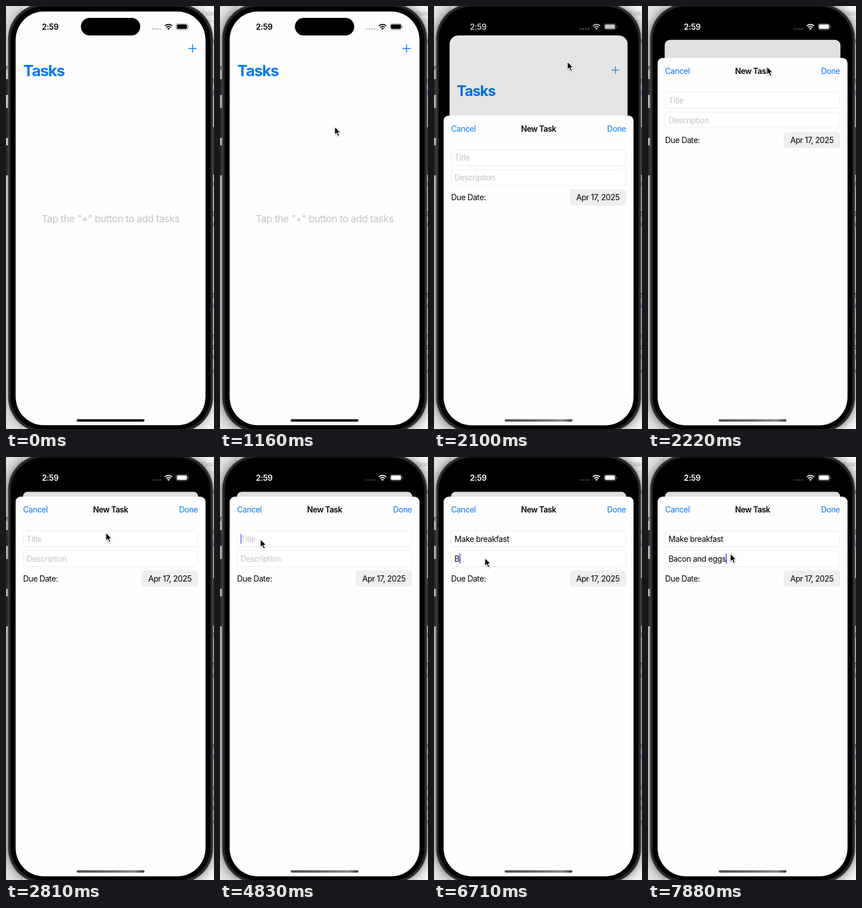
An HTML page for the animation above (8 s loop, 368 px wide and 747 px high).

```html
<!DOCTYPE html>
<html lang="en">
<head>
<meta charset="utf-8">
<title>Task list</title>
<style>
  html, body { margin: 0; width: 100%; height: 100%; overflow: hidden; background: #eee; }
  svg { display: block; width: 368px; height: 747px; }
  text { font: 14px Inter, "Liberation Sans", sans-serif; letter-spacing: -.4px; white-space: pre; }
  .blue { fill: #007aff; }
  .hint { fill: #c4c4c6; }
  .mid { text-anchor: middle; }
  .end { text-anchor: end; }
  .semi { font-weight: 600; letter-spacing: -.5px; }
  .code { font-size: 11px; fill: #222; }
  .field { fill: #fff; stroke: #ececed; }
  #heading { font-size: 27.5px; font-weight: 700; letter-spacing: -1.2px; }
  #empty { font-size: 17.5px; letter-spacing: -.47px; }
  #clock { letter-spacing: -.3px; }
</style>
</head>
<body>
<svg viewBox="0 0 368 747">
  <defs>
    <clipPath id="screen"><rect x="17" y="9.5" width="336" height="731" rx="50"/></clipPath>
    <filter id="blur" x="-20%" y="-20%" width="140%" height="140%"><feGaussianBlur stdDeviation="9"/></filter>
    <filter id="soft" x="-50%" y="-50%" width="200%" height="200%">
      <feDropShadow dx="0" dy="1" stdDeviation="1" flood-opacity=".35"/>
    </filter>
    <linearGradient id="bar">
      <stop offset="0" stop-color="#505052"/><stop offset=".5" stop-color="#69696b"/>
      <stop offset=".85" stop-color="#8a8a8c"/><stop offset="1" stop-color="#3a3a3c"/>
    </linearGradient>
  </defs>

  <!-- desktop behind the phone -->
  <rect width="368" height="747" fill="#f5f5f5"/>
  <rect width="28" height="747" fill="#e2e2e2"/>
  <path d="M28.5 0V747" stroke="#c4c4c4"/>
  <path d="M330 26.5H368" stroke="#d8d8d8"/>
  <text class="code" x="345" y="17" style="fill:#bdbdbd">Task</text>
  <text class="code" x="0" y="113">r</text>
  <rect id="shadow" x="3.5" y="-4" width="363" height="757" rx="62" filter="url(#blur)"/>
  <g id="scraps"></g>

  <!-- phone body -->
  <g fill="#2a2a2b">
    <rect x="-2" y="129" width="7" height="28"/>
    <rect x="-2" y="180" width="7" height="53"/>
    <rect x="-2" y="246" width="7" height="53"/>
    <rect x="365" y="214" width="5" height="84"/>
  </g>
  <rect x="3.5" y="-4" width="363" height="757" rx="62" fill="#545456"/>
  <rect x="4.7" y="-2.8" width="360.6" height="754.6" rx="61" fill="#28282a"/>
  <rect x="8.3" y=".8" width="353.4" height="747.4" rx="58" fill="#000"/>

  <g clip-path="url(#screen)">
    <g id="home">
      <rect id="page" x="17" y="9.5" width="336" height="731" fill="#fefefe"/>
      <path id="plus" d="M322.7 75H337.3M330 67.7V82.3" stroke="#007aff" stroke-width="1.5"/>
      <text id="heading" class="blue" x="30.5" y="123.5">Tasks</text>
      <text id="empty" class="hint mid" x="185" y="381.7">Tap the "+" button to add tasks</text>
      <rect id="dim" x="17" y="9.5" width="336" height="731"/>
    </g>
    <!-- sheet, placed at its resting position -->
    <g id="sheet">
      <rect x="17" y="70" width="336" height="720" rx="9" fill="#fefefe"/>
      <text class="blue" x="30.3" y="98.2">Cancel</text>
      <text class="semi mid" x="185" y="98.2">New Task</text>
      <text class="blue end" x="339.6" y="98.2">Done</text>
      <rect class="field" x="30.5" y="130.5" width="309" height="28" rx="4"/>
      <rect class="field" x="30.5" y="165.5" width="309" height="28" rx="4"/>
      <text id="title" x="36.3" y="149.8"></text>
      <text id="note" x="36.3" y="184.8"></text>
      <text x="30.3" y="219.8">Due Date:</text>
      <rect x="240" y="200.5" width="100" height="28.5" rx="6" fill="#eeeeef"/>
      <text class="mid" x="290" y="219.8">Apr 17, 2025</text>
      <rect id="caret" width="1.7" height="18" rx=".8" fill="#3a50f0"/>
    </g>
    <rect id="indicator" x="125" y="729.7" width="120" height="4.2" rx="2.1"/>
  </g>

  <!-- status bar -->
  <rect x="132.5" y="21" width="105" height="31" rx="15.5"/>
  <g id="dots">
    <circle cx="259.3" cy="40.5" r="1.5"/><circle cx="263.9" cy="40.5" r="1.5"/>
    <circle cx="268.5" cy="40.5" r="1.5"/><circle cx="273.1" cy="40.5" r="1.5"/>
  </g>
  <g id="status">
    <text id="clock" class="semi" x="63.5" y="42" fill="currentColor">2:59</text>
    <g fill="none" stroke="currentColor" stroke-width="2">
      <path d="M281.1 35.1A9.1 9.1 0 0 1 293.9 35.1"/>
      <path d="M283.6 37.8A5.6 5.6 0 0 1 291.4 37.8"/>
    </g>
    <path d="M287.5 42.2L285.3 39.8A3.2 3.2 0 0 1 289.7 39.8Z" fill="currentColor"/>
    <rect x="301" y="31.2" width="20.6" height="10.8" rx="3.2" fill="none" stroke="currentColor" opacity=".4"/>
    <rect x="302.4" y="32.6" width="17.8" height="8" rx="2" fill="currentColor"/>
    <path d="M322.7 35V38.4Q324 38 324 36.7T322.7 35Z" fill="currentColor" opacity=".45"/>
  </g>

  <path id="pointer" d="M0 0V14.6L3.3 11.5L5.6 17L8.2 15.9L5.9 10.6H10.4Z" stroke="#fff" stroke-width="1.1"
    stroke-linejoin="round" filter="url(#soft)"/>
</svg>
<script>
const LOOP = 8000;
const $ = id => document.getElementById(id);
const set = (id, attrs) => {
  for (const k in attrs) $(id).setAttribute(k, attrs[k]);
};
const mix = (a, b, p) => a + (b - a) * p;
const clamp = v => Math.min(1, Math.max(0, v));
const gray = v => `rgb(${[v, v, v].map(Math.round)})`;

// last key whose time has passed: [time, ...values]
const at = (keys, t) => keys.filter(k => k[0] <= t).pop();

const POINTER = [
  [470, 218, 2], [580, 215, 62], [700, 206, 132], [810, 200, 185],
  [1050, 203, 213], [1170, 256, 148], [1280, 307, 73],
  [1510, 324, 74], [1630, 329, 75], [1740, 326, 76], [1860, 303, 80],
  [1980, 265.5, 87.5], [2100, 236, 98], [2220, 210.5, 107], [2330, 197, 115],
  [2450, 187, 123], [2570, 181, 129], [2690, 178, 132], [2810, 176.8, 133.5],
  [3280, 148, 139], [3400, 122, 139.5],
  [3870, 98, 142], [3990, 78, 144.5], [4110, 71.5, 145],
  [5880, 73, 151], [6000, 83, 168], [6120, 90, 178],
  [7660, 106, 176], [7780, 132, 172], [7880, 145.8, 170.5]
];
const TITLE = "Make breakfast", NOTE = "Bacon and eggs";
const TITLE_KEYS = [[0, 0], [4950, 2], [5060, 4], [5180, 6], [5300, 7], [5410, 9], [5530, 11], [5650, 12], [5770, 13], [5880, 14]];
const NOTE_KEYS = [[0, 0], [6710, 1], [6820, 2], [6940, 4], [7060, 5], [7180, 7], [7300, 8], [7420, 10], [7540, 11], [7660, 12], [7780, 13], [7880, 14]];
const PLUS_KEYS = [[0, 1], [1630, .3], [1860, .55], [1980, .8]];

// slivers of an editor window showing past the right edge
[62, 133, 152, 313, 367, 385, 511, 529, 583, 602, 619, 645].forEach((y, i) => {
  const s = document.createElementNS("http://www.w3.org/2000/svg", "text");
  s.textContent = "stgatatacoas"[i];
  s.setAttribute("class", "code");
  s.setAttribute("x", 365);
  s.setAttribute("y", y + 4);
  if (i % 5 === 2) s.style.fill = "#1c1c9c";
  $("scraps").append(s);
});

function rise(t) {
  const sample = 1510 + 118 * Math.floor((t - 1500) / 118);
  const u = Math.max(0, sample - 1930) * .01826;
  return 1 - (1 + u) * Math.exp(-u);
}

function typed(id, word, hint, count) {
  const el = $(id);
  const value = count ? word.slice(0, count) : hint;
  if (el.textContent !== value) el.textContent = value;
  el.setAttribute("class", count ? "" : "hint");
  return count ? el.getComputedTextLength() : 0;
}

function draw(t) {
  const p = rise(t);
  const scale = mix(1, .9226, p);
  const top = mix(9.5, 61.5, p);
  set("shadow", { opacity: t < 230 ? .3 : .55 });
  set("home", { transform: `translate(185 ${top}) scale(${scale}) translate(-185 -9.5)` });
  set("page", { rx: mix(50, 9, p) });
  set("dim", { rx: mix(50, 9, p), opacity: .12 * p });
  set("plus", { opacity: at(PLUS_KEYS, t)[1] });
  set("sheet", { transform: `translate(0 ${mix(670.5, 0, p)})`, visibility: p > 0 ? "visible" : "hidden" });
  set("indicator", { fill: p > 0 ? "url(#bar)" : "#000" });

  const light = clamp((p - .25) / .72);
  $("status").style.color = gray(255 * light);
  set("dots", { fill: gray(mix(188, 66, light)) });
  // black behind the page once it has shrunk
  $("screenBack").setAttribute("opacity", p > 0 ? 1 : 0);

  const titleWidth = typed("title", TITLE, "Title", at(TITLE_KEYS, t)[1]);
  const noteWidth = typed("note", NOTE, "Description", at(NOTE_KEYS, t)[1]);
  const inNote = t >= 6360;
  set("caret", {
    x: 36.3 + (inNote ? noteWidth : titleWidth),
    y: inNote ? 170.5 : 135.5,
    opacity: t < 3990 ? 0 : t >= 4830 && t < 4950 ? .75 : 1
  });

  const pos = at(POINTER, t);
  set("pointer", pos
    ? { visibility: "visible", transform: `translate(${pos[1]} ${pos[2]})` }
    : { visibility: "hidden" });
}

const back = document.createElementNS("http://www.w3.org/2000/svg", "rect");
back.id = "screenBack";
$("home").before(back);
set("screenBack", { x: 17, y: 9.5, width: 336, height: 731 });

const start = performance.now();
function frame() {
  draw((performance.now() - start) % LOOP);
  requestAnimationFrame(frame);
}
frame();
</script>
</body>
</html>
```
